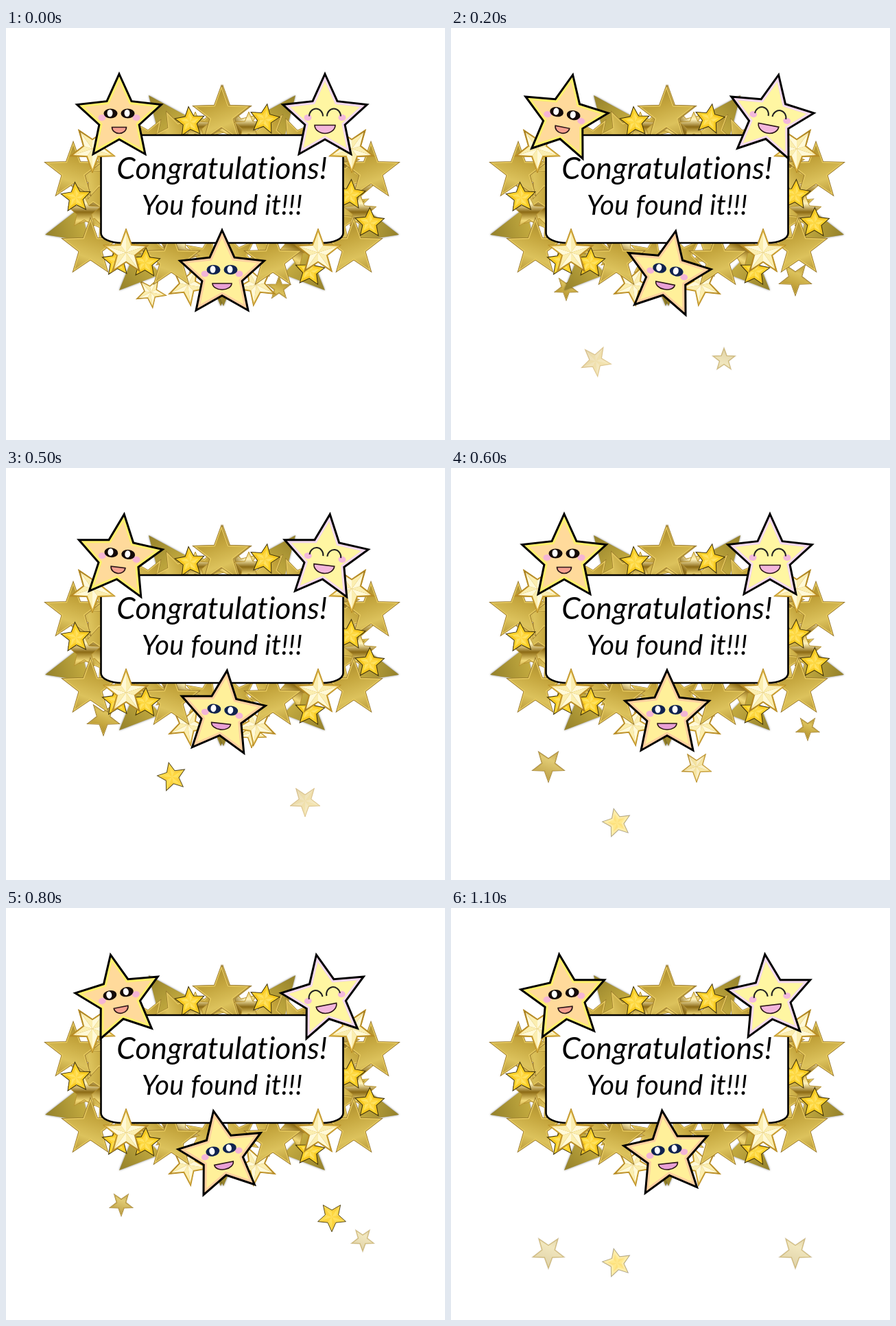
Recreate the animation shown at these times as an HTML page with a canvas. Size 640 px wide and 600 px high, loop 1200 ms.

```html
<!DOCTYPE html>
<html lang="en">
<head>
<meta charset="utf-8">
<title>Congratulations</title>
<style>
html, body { margin: 0; width: 100%; height: 100%; overflow: hidden; background: #fff; }
canvas { display: block; }
</style>
</head>
<body>
<canvas id="stage" width="640" height="600"></canvas>
<script>
const ctx = document.getElementById('stage').getContext('2d');
const STEP = 100, STEPS = 12, MIDDLE = 315;

function points(r, inner) {
  return Array.from({ length: 10 }, (_, i) => {
    const a = i * Math.PI / 5, d = i % 2 ? r * inner : r;
    return [d * Math.sin(a), -d * Math.cos(a)];
  });
}

function trace(pts) {
  ctx.beginPath();
  pts.forEach(p => ctx.lineTo(...p));
  ctx.closePath();
}

function fill(color) { ctx.fillStyle = color; ctx.fill(); }
function stroke(color, width) { ctx.strokeStyle = color; ctx.lineWidth = width; ctx.stroke(); }

function gradient(x0, y0, x1, y1, colors) {
  const g = ctx.createLinearGradient(x0, y0, x1, y1);
  colors.forEach((c, i) => g.addColorStop(i / (colors.length - 1), c));
  return g;
}

function oval(x, y, rx, ry, color) {
  ctx.beginPath();
  ctx.ellipse(x, y, rx, ry, 0, 0, 7);
  fill(color);
}

function facets(pts, even, odd) {
  pts.forEach((p, i) => {
    trace([[0, 0], p, pts[(i + 1) % 10]]);
    fill(i % 2 ? odd : even);
  });
}

function random(seed) {
  const n = Math.sin(seed * 12.9898) * 43758.5453;
  return n - Math.floor(n);
}

const looks = {
  gold(r) {
    trace(points(r - 1, .41));
    fill(gradient(r * .4, -r, -r * .3, r, ['#a5862a', '#c3a43c', '#dcc25c', '#b08f30']));
    stroke('#94742a', 1.5);
    trace(points(r * .92, .41));
    stroke('#e6c95f', r > 30 ? 1.5 : .7);
  },
  bevel(r) {
    trace(points(r - 1, .41));
    fill(gradient(-r, -r, r, r, ['#f0d060', '#c99a2a', '#8f6815']));
    stroke('#b88d26', 1);
    facets(points(r * .82, .42), '#fbeeb0', '#fff9d8');
  },
  yellow(r) {
    const pts = points(r - .5, .47);
    facets(pts, '#ffd52b', '#f8c81e');
    facets(points(r * .6, .5), '#ffe260', '#ffd840');
    trace(pts);
    stroke('#3a2e08', 1);
  },
  metal(r) {
    trace(points(r, .45));
    fill(gradient(0, -r, 0, r, ['#e6c65a', '#fff3bd', '#8c6a14', '#f1d878', '#b38e29']));
    stroke('#b99430', 1);
  }
};

function star(look, x, y, r, deg = 0) {
  ctx.save();
  ctx.translate(x, y);
  ctx.rotate(deg * Math.PI / 180);
  looks[look](r);
  ctx.restore();
}

// Runs a drawing twice, the second time flipped around the middle
function mirrored(paint) {
  paint();
  ctx.save();
  ctx.transform(-1, 0, 0, 1, 2 * MIDDLE, 0);
  paint();
  ctx.restore();
}

const kinds = {
  dust: { look: 'gold', r: 18, top: 379, drop: 52 },
  chunk: { look: 'gold', r: 25, top: 365, drop: 68 },
  shine: { look: 'bevel', r: 24, top: 385, drop: 50 },
  spark: { look: 'yellow', r: 22, top: 383, drop: 67 }
};

// kind, x, starting steps, angle
const fallers = [
  ['shine', 211, [0], 173],
  ['dust', 398, [0], 0],
  ['dust', 168, [2, 7]],
  ['chunk', 502, [2, 9]],
  ['shine', 436, [3]],
  ['spark', 242, [4, 9], -13],
  ['chunk', 142, [5, 9]],
  ['shine', 358, [5]],
  ['dust', 520, [6]],
  ['spark', 475, [7]]
];

function drawFallers(step) {
  for (const [kind, x, starts, deg = 180] of fallers) {
    const { look, r, top, drop } = kinds[kind];
    for (const start of starts) {
      const age = step - start;
      if (age < 0 || age > 2) continue;
      ctx.globalAlpha = 1 - .15 * age * age;
      star(look, x, top + drop * age, r, deg);
    }
  }
  ctx.globalAlpha = 1;
}

function drawShard(x, y) {
  ctx.save();
  ctx.translate(x, y);
  ctx.rotate(Math.atan2(235 - y, MIDDLE - x));
  ctx.shadowColor = '#0008';
  ctx.shadowBlur = 3;
  trace([[0, 0], [60, -26], [60, 26]]);
  fill(gradient(0, 0, 60, 0, ['#93802a', '#c4ab40']));
  ctx.restore();
}

const tips = [[208, 98], [57, 301], [165, 382], [313, 405]];
const golds = [[316, 127], [98, 209], [123, 320], [241, 338]];
const yellows = [
  [268, 137], [377, 133], [102, 247], [502, 243],
  [530, 284], [203, 342], [443, 354], [162, 340]
];

function drawCluster() {
  mirrored(() => tips.forEach(p => drawShard(...p)));
  for (let i = 0; i < 26; i++) {
    const a = i / 26 * 2 * Math.PI;
    star(i % 4 ? 'gold' : 'metal', MIDDLE + 188 * Math.cos(a), 240 + 94 * Math.sin(a), 34, 72 * random(i));
  }
  mirrored(() => {
    star('metal', 114, 268, 25);
    star('metal', 276, 144, 22);
    star('bevel', 265, 374, 32, 172);
    golds.forEach(p => star('gold', ...p, 44));
  });
  yellows.forEach((p, i) => star('yellow', ...p, 23, 16 * random(i) - 5));
}

function drawBanner() {
  ctx.beginPath();
  ctx.roundRect(138.5, 156, 353, 157, { x: 30, y: 14 });
  fill('#fff');
  stroke('#000', 2.6);
  ctx.fillStyle = '#000';
  ctx.textAlign = 'center';
  ctx.letterSpacing = '0.3px';
  ctx.font = 'italic 44px Lato, sans-serif';
  ctx.fillText('Congratulations!', MIDDLE, 220);
  ctx.font = 'italic 40px Lato, sans-serif';
  ctx.fillText('You found it!!!', MIDDLE, 272);
  mirrored(() => {
    star('bevel', 126, 176, 36, 180);
    star('bevel', 175, 327, 36);
  });
}

const buddies = [
  { x: 165, y: 131.5, body: '#ffda9b', rim: '#fff06c', cheek: '#f5b5d4', eye: '#140a08',
    mouth: [13, 10.5, 9, '#f6a08f'] },
  { x: 465, y: 131.5, body: '#fff6a2', rim: '#f3d9ee', cheek: '#f3b8dc',
    mouth: [10, 15, 12, '#f3b6dc'] },
  { x: 315, y: 359, body: '#fff09a', rim: '#ffcf9f', cheek: '#f3b5d6', eye: '#10234f',
    mouth: [13, 14, 9, '#e9a0d6'] }
];

function drawBuddy(b, angle) {
  ctx.save();
  ctx.translate(b.x, b.y);
  ctx.rotate(angle);
  trace(points(64.5, .475));
  fill(b.body);
  ctx.save();
  ctx.clip();
  stroke(b.rim, 9);
  ctx.restore();
  stroke('#000', 3);

  for (const side of [-1, 1]) {
    oval(side * 25, -1, 5.5, 4.5, b.cheek);
    if (b.eye) {
      oval(side * 12.5, -7, 10, 7, b.eye);
      oval(side * 12.5 - 1, -7.5, 4, 5.2, '#fff');
    } else {
      ctx.beginPath();
      ctx.ellipse(side * 13, -3, 10, 11, 0, Math.PI, 0);
      stroke('#222', 2);
    }
  }

  const [y, w, h, color] = b.mouth;
  ctx.beginPath();
  ctx.ellipse(0, y, w, h, 0, 0, Math.PI);
  ctx.closePath();
  fill(color);
  stroke('#2a1518', 1.6);
  ctx.restore();
}

function draw(step) {
  ctx.fillStyle = '#fff';
  ctx.fillRect(0, 0, 640, 600);
  drawFallers(step);
  drawCluster();
  drawBanner();
  const sway = 13 * Math.PI / 180 * Math.sin(step * 2 * Math.PI / STEPS);
  buddies.forEach(b => drawBuddy(b, sway));
}

const begin = performance.now();
function tick() {
  const elapsed = Math.max(0, performance.now() - begin);
  draw(Math.floor(elapsed / STEP) % STEPS);
  requestAnimationFrame(tick);
}
tick();
</script>
</body>
</html>
```
